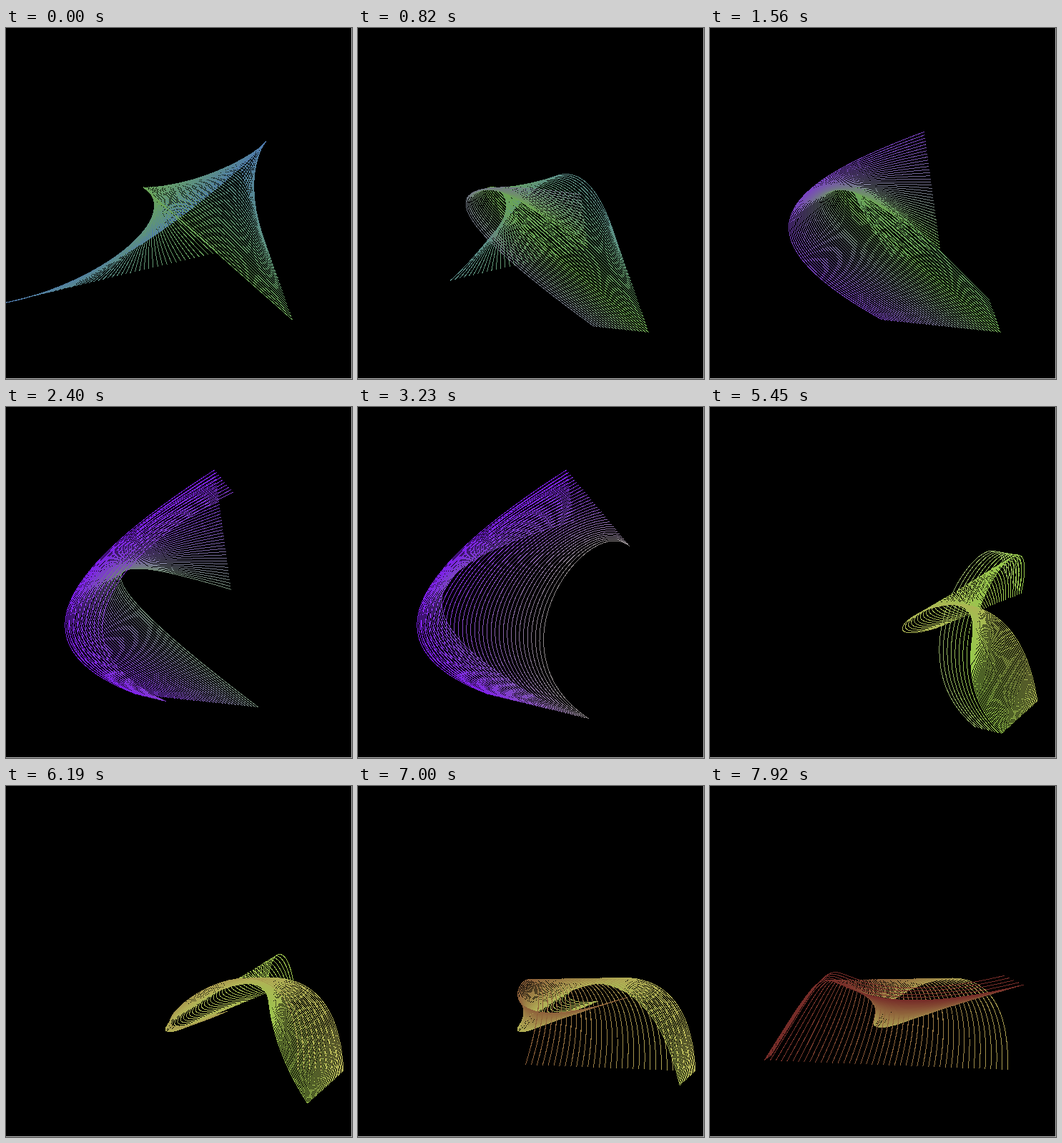
An HTML page for the animation above (8000 ms loop, 484x491 px).

```html
<!DOCTYPE html>
<html>
<head>
<meta charset="utf-8">
<title>Drifting Bezier</title>
<style>
  html, body { margin: 0; width: 100%; height: 100%; overflow: hidden; background: #bbb; }
  svg { display: block; background: #000; fill: none; shape-rendering: crispEdges; }
</style>
</head>
<body>
<svg id="stage" width="483" height="490"></svg>
<script>
const LOOP = 8000;   // ms
const SPAN = 1905;   // ms from one pose to the next
const LEAD = 1765;   // ms already gone in the first span at time 0
const STEPS = 50;    // curves per span
const TRAIL = 48;    // curves kept on screen

// Four points drift in straight lines from pose to pose, and the colour blends along.
const pose = (color, start, bendA, bendB, end) => ({
  points: [start, bendA, bendB, end],
  rgb: [1, 3, 5].map(i => parseInt(color.slice(i, i + 2), 16))
});

const poses = [
  pose('#4e7aac', [328, 202], [448, 58], [225, 342], [0, 384]),
  pose('#6ca850', [407, 426], [65, 145], [182, 205], [322, 308]),
  pose('#7d1eeb', [183, 402], [0, 332], [86, 220], [292, 88]),
  pose('#96c84b', [408, 457], [283, 341], [472, 99], [435, 261]),
  pose('#b2b056', [472, 399], [456, 97], [78, 428], [285, 322]),
  pose('#762c28', [76, 384], [220, 153], [90, 364], [439, 278]),
  pose('#762c28', [190, 300], [300, 130], [300, 20], [100, 120])
];

const mix = (a, b, f) => a.map((v, i) => v + (b[i] - v) * f);

const stage = document.getElementById('stage');
const curves = Array.from({ length: TRAIL }, () =>
  stage.appendChild(document.createElementNS('http://www.w3.org/2000/svg', 'path')));

function placeCurve(path, step) {
  const progress = step / STEPS;
  const index = Math.max(0, Math.floor(progress));
  const from = poses[index], to = poses[index + 1];
  const f = progress - index;
  const [start, ...rest] = from.points.map((p, i) => mix(p, to.points[i], f));
  path.setAttribute('d', `M${start}C${rest.join(' ')}`);
  path.setAttribute('stroke', `rgb(${mix(from.rgb, to.rgb, f).map(Math.round)})`);
}

function render(time) {
  const newest = Math.floor((time + LEAD) / SPAN * STEPS);
  curves.forEach((path, i) => placeCurve(path, newest - TRAIL + 1 + i));
}

const begin = performance.now();
function tick() {
  render((performance.now() - begin) % LOOP);
  requestAnimationFrame(tick);
}
tick();
</script>
</body>
</html>
```
